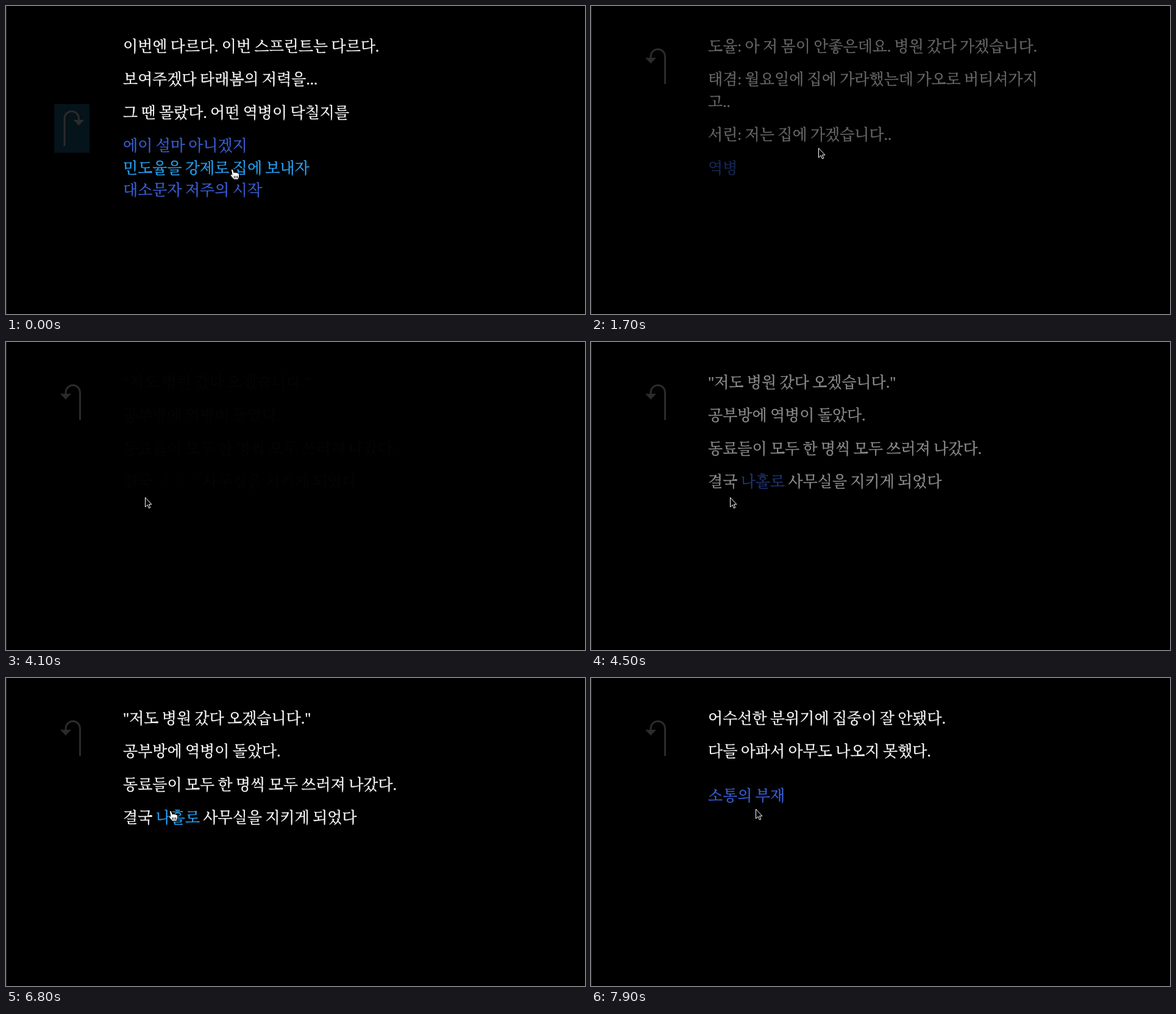
Write an HTML page that moves like this. It is 950x506 px and loops after 8000 ms.

```html
<!DOCTYPE html>
<html lang="ko">
<head>
<meta charset="utf-8">
<style>
  html, body { margin: 0; width: 100%; height: 100%; overflow: hidden; background: #000; }
  body { position: relative; box-sizing: border-box; border-left: 1px solid #2c2c2c; }
  section {
    position: absolute; left: 191px; top: 49px; white-space: nowrap; color: #fff;
    font: 500 25px/36.3px "Liberation Serif", "Noto Serif CJK KR", "Noto Sans CJK KR", "Noto Sans CJK", serif;
    word-spacing: -.9px; -webkit-text-stroke: .35px;
  }
  p { margin: 0 0 18.2px; }
  svg { position: absolute; left: -1px; top: 0; }
</style>
</head>
<body>
<section>
  <p>이번엔 다르다. 이번 스프린트는 다르다.</p>
  <p>보여주겠다 타래봄의 저력을...</p>
  <p>그 땐 몰랐다. 어떤 역병이 닥칠지를</p>
  <p><a>에이 설마 아니겠지</a><br><a>민도율을 강제로 집에 보내자</a><br><a>대소문자 저주의 시작</a></p>
</section>
<section>
  <p>도율: 아 저 몸이 안좋은데요. 병원 갔다 가겠습니다.</p>
  <p>태겸: 월요일에 집에 가라했는데 가오로 버티셔가지<br>고..</p>
  <p>서린: 저는 집에 가겠습니다..</p>
  <p><a>역병</a></p>
</section>
<section>
  <p>"저도 병원 갔다 오겠습니다."</p>
  <p>공부방에 역병이 돌았다.</p>
  <p>동료들이 모두 한 명씩 모두 쓰러져 나갔다.</p>
  <p>결국 <a>나홀로</a> 사무실을 지키게 되었다</p>
</section>
<section>
  <p>어수선한 분위기에 집중이 잘 안됐다.</p>
  <p>다들 아파서 아무도 나오지 못했다.<br><br><a>소통의 부재</a></p>
</section>
<svg width="950" height="506">
  <defs>
    <g id="turn">
      <path d="M121.5 128V83a11.75 12 0 0 0-23.5 0v4" fill="none" stroke="#2b2b2b" stroke-width="3"/>
      <path d="M89 85h18l-9 9.500z" fill="#2b2b2b"/>
    </g>
  </defs>
  <g id="redo">
    <rect x="79" y="161" width="58" height="80" fill="#05131a"/>
    <use href="#turn" transform="translate(217.500 102) scale(-1 1)"/>
  </g>
  <use id="undo" href="#turn"/>
  <g id="cursor">
    <path id="arrow" d="M.5 .5V16l3.700-3.400L6.500 18l2.300-1-2.300-5.200H11z" fill="#000" stroke="#fff"/>
    <g id="hand">
      <path d="M-2.500 1Q-1-1 .5 1L2 6Q3.500 4.500 5 6Q6.500 5 8 6.500Q10 6 10.500 8V12L9 17H2L-2 12.500Q-5 9-2.500 8.500L-1 9.500Z" fill="#fff" stroke="#000"/>
      <path d="M2.500 11v4M5 11v4M7.500 11v4" stroke="#000"/>
    </g>
  </g>
</svg>
<script>
const LOOP = 8000, FADE = 740, HOVER = 200;
const starts = [-FADE, 1400, 4090, 7000];
const path = [ // time, x, y of the pointer tip
  [0, 372, 268], [350, 374, 290], [700, 374, 288], [1200, 373, 233], [2300, 373, 233],
  [2800, 308, 223], [3500, 228, 255], [4700, 228, 255], [5200, 234, 154],
  [5650, 236, 140], [6400, 271, 218], [6800, 271, 218], [7300, 270, 215],
];
const $ = id => document.getElementById(id);
const show = (el, on) => el.style.display = on ? '' : 'none';
const clamp = v => Math.max(0, Math.min(1, v));

const scenes = [...document.querySelectorAll('section')].map(el => ({
  el,
  links: [...el.querySelectorAll('a')].map(a => ({ a, box: a.getBoundingClientRect() })),
}));

const sceneAt = t => starts.findLastIndex(s => t >= s);

function pointer(t) {
  const i = path.findIndex(p => p[0] > t);
  if (i < 1) return path.at(i).slice(1);
  const [a, b] = [path[i - 1], path[i]];
  const u = clamp((t - a[0]) / (b[0] - a[0])), k = u * u * (3 - 2 * u);
  return [1, 2].map(n => a[n] + (b[n] - a[n]) * k);
}

function hovers({ box }, t) {
  const [x, y] = pointer(Math.max(0, t));
  const middle = (box.top + box.bottom) / 2;
  return x >= box.left && x <= box.right && Math.abs(y - middle) < 18;
}

// Share of the last HOVER ms spent over the link
function glow(link, t, since) {
  let sum = 0;
  for (let d = 0; d < HOVER; d += 10) sum += t - d >= since && hovers(link, t - d);
  return sum * 10 / HOVER;
}

function draw(now) {
  const t = now % LOOP, current = sceneAt(t), [x, y] = pointer(t);
  scenes.forEach(({ el }, i) => el.style.opacity = i === current ? clamp((t - starts[i]) / FADE) : 0);
  const { links } = scenes[current];
  for (const link of links) {
    const g = glow(link, t, starts[current]);
    const mix = (a, b) => a + (b - a) * g;
    link.a.style.color = `rgb(${mix(58, 39)}, ${mix(95, 163)}, ${mix(212, 245)})`;
  }
  const over = links.some(link => hovers(link, t));
  show($('redo'), current === 0);
  show($('undo'), current > 0);
  show($('hand'), over);
  show($('arrow'), !over);
  $('cursor').setAttribute('transform', `translate(${x} ${y})`);
  requestAnimationFrame(draw);
}
requestAnimationFrame(draw);
</script>
</body>
</html>
```
